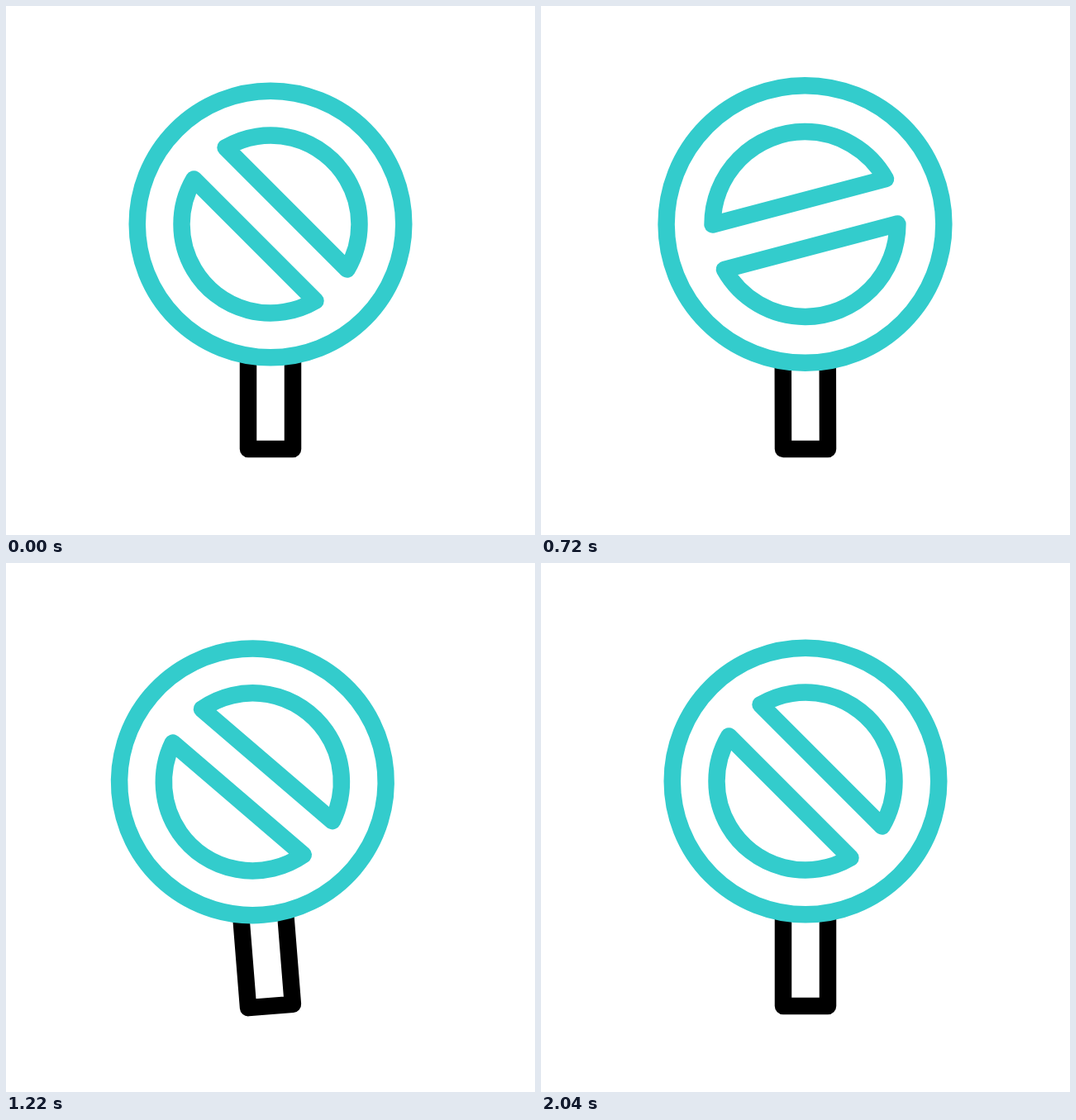
Animation, 640 px wide and 640 px high, one loop 2.62 s. Source, as an HTML page with a canvas:

```html
<!DOCTYPE html>
<html lang="en">
<head>
<meta charset="utf-8">
<title>Swinging sign</title>
<style>
  html, body { margin: 0; width: 100%; height: 100%; overflow: hidden; background: #fff; }
  canvas { display: block; width: 640px; height: 640px; }
</style>
</head>
<body>
<canvas id="stage" width="640" height="640"></canvas>
<script>
const ctx = document.getElementById('stage').getContext('2d');
const LOOP = 2620, STEP = 20, SPIN_TIME = 1240;
const TEAL = '#33cccc', LINE = 20.5;
const PIVOT = { x: 320, y: 536 }, ARM = 272;
const RING = 161.25, HALF = 107.5, GAP = 27;
const RAD = Math.PI / 180;

// [time in ms, value], eased between neighbours
const SWING = [[0, 0], [331, -14], [440, -14], [930, 8.9], [1286, -5.9],
               [1694, 2.5], [1890, -1.05], [2040, 0]];
const SCALE = [[0, 1], [400, 0.964], [800, 1.05], [1240, 1]];

const smooth = u => u * u * (3 - 2 * u);

function track(keys, t) {
  for (let i = 1; i < keys.length; i++) {
    const [t0, a] = keys[i - 1], [t1, b] = keys[i];
    if (t < t1) return a + (b - a) * smooth((t - t0) / (t1 - t0));
  }
  return keys[keys.length - 1][1];
}

// cubic-bezier(a, 0, b, 1)
function bezier(a, b, x) {
  let lo = 0, hi = 1;
  for (let i = 0; i < 30; i++) {
    const s = (lo + hi) / 2, r = 1 - s;
    if (3 * s * r * r * a + 3 * s * s * r * b + s * s * s < x) lo = s;
    else hi = s;
  }
  return smooth((lo + hi) / 2);
}

function drawHandle() {
  ctx.strokeStyle = '#000';
  ctx.beginPath();
  ctx.moveTo(-27, -130);
  ctx.lineTo(-27, 0);
  ctx.lineTo(27, 0);
  ctx.lineTo(27, -130);
  ctx.stroke();
}

function drawSign(k, turn) {
  ctx.strokeStyle = TEAL;
  ctx.fillStyle = '#fff';
  ctx.beginPath();
  ctx.arc(0, 0, RING * k, 0, 2 * Math.PI);
  ctx.fill();
  ctx.stroke();

  const tip = Math.asin(GAP / HALF);
  ctx.rotate((45 + turn) * RAD);
  for (let side = 0; side < 2; side++) {
    ctx.beginPath();
    ctx.arc(0, 0, HALF * k, tip, Math.PI - tip);
    ctx.closePath();
    ctx.stroke();
    ctx.rotate(Math.PI);
  }
}

function draw(t) {
  ctx.setTransform(1, 0, 0, 1, 0, 0);
  ctx.fillStyle = '#fff';
  ctx.fillRect(0, 0, 640, 640);
  ctx.lineWidth = LINE;
  ctx.lineJoin = 'round';

  const turn = -360 * bezier(0.352, 0.582, Math.min(t / SPIN_TIME, 1));
  ctx.translate(PIVOT.x, PIVOT.y);
  ctx.rotate(track(SWING, t) * RAD);
  drawHandle();
  ctx.translate(0, -ARM);
  drawSign(track(SCALE, t), turn);
}

const start = performance.now();
function tick() {
  const t = (performance.now() - start) % LOOP;
  draw(Math.floor(t / STEP) * STEP);
  requestAnimationFrame(tick);
}
tick();
</script>
</body>
</html>
```
